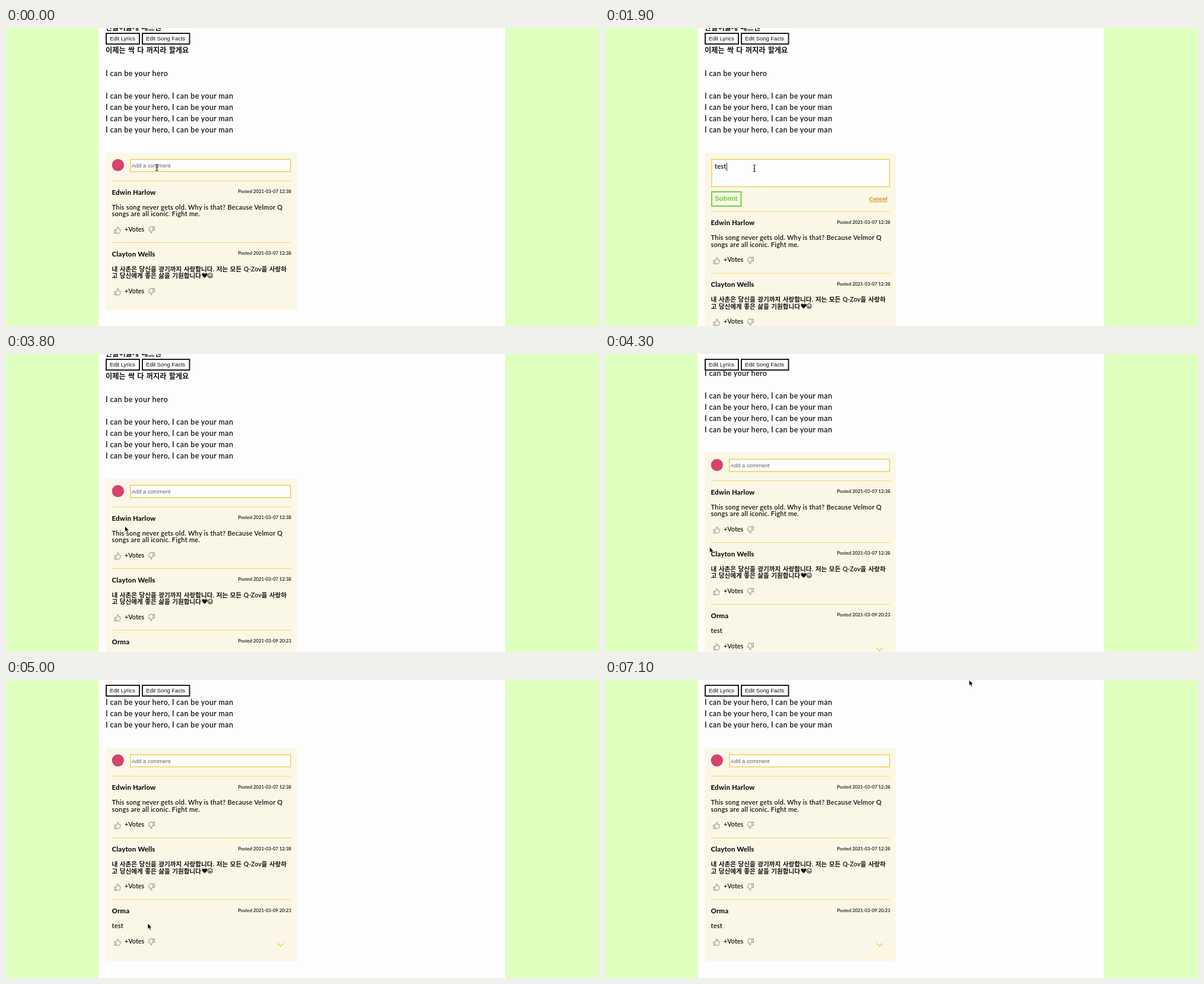
An HTML page for the animation above (7.2 s loop, 1000 by 502 pixels).

```html
<!DOCTYPE html>
<html lang="ko">
<head>
<meta charset="utf-8">
<title>Comments</title>
<style>
html, body { margin: 0; width: 100%; height: 100%; overflow: hidden; background: #deffbd; }
svg { display: block; width: 1000px; height: 502px; }
text { font-family: Lato, "Noto Sans CJK KR", "Noto Sans CJK", sans-serif; font-weight: 600; fill: #111; white-space: pre; }
.ui { font-family: "Liberation Sans", Arial, sans-serif; font-weight: 400; font-size: 9.4px; }
.bold { font-weight: 700; }
.lyric { font-size: 12.5px; letter-spacing: .36px; }
.lyric-ko { font-size: 12.2px; word-spacing: 1.2px; }
.name { font-size: 11.5px; font-weight: 800; letter-spacing: .15px; }
.date { font-size: 7.8px; text-anchor: end; }
.body { font-size: 11px; letter-spacing: .25px; }
.body-ko { font-size: 10.6px; word-spacing: .9px; }
.votes { font-size: 10.8px; }
.field { fill: #fdfdfd; stroke: #eed262; stroke-width: 1.6; }
.rule { stroke: #f1d670; stroke-width: 1; }
.icon { fill: none; stroke: #85837a; stroke-width: .9; stroke-linejoin: round; }
</style>
</head>
<body>
<svg viewBox="0 0 1000 502">
  <defs>
    <path id="thumb" class="icon" d="M-5-.5h2.6v6H-5zM-2.4-.2L-.3-2.6V-5.2Q1.8-5.8 1.9-3.2L1.5-1.4H4Q5.5-1.2 5-.1L4 4.4Q3.7 5.5 2.6 5.5H-1L-2.4 4.8"/>
  </defs>
  <rect width="1000" height="502" fill="#deffbd"/>
  <rect x="156.5" width="685.5" height="502" fill="#fdfdfd"/>
  <g id="page">
    <g id="lyrics"></g>
    <rect id="panel" x="168" y="210" width="322.5" fill="#fbf7e6"/>
    <g id="closed">
      <circle cx="188.8" cy="231" r="10.2" fill="#d6436b"/>
      <rect class="field" x="209.8" y="221.3" width="270" height="20.6"/>
      <text class="ui" x="211.8" y="235" fill-opacity=".65">Add a comment</text>
    </g>
    <g id="open">
      <rect class="field" x="179.8" y="221.3" width="300" height="46"/>
      <text id="hint" x="188" y="239" font-size="11.5" letter-spacing=".15" style="fill:#666;font-weight:500">Add a comment</text>
      <text id="typed" x="185" y="237" class="body"></text>
      <rect id="caret" y="227" width="1" height="14" fill="#222"/>
      <rect x="180" y="276" width="49.5" height="24" fill="#fcf9ec" stroke="#6bd636" stroke-width="2"/>
      <text class="ui bold" x="185" y="291.3" style="font-size:11.4px;fill:#5fd321">Submit</text>
      <text class="ui bold" x="445.5" y="291.3" text-decoration="underline" style="fill:#c2981c">Cancel</text>
    </g>
    <g id="comments"></g>
  </g>
  <rect x="168" y="8" width="322" height="20" fill="#fdfdfd"/>
  <g id="buttons"></g>
  <g id="cursor">
    <path id="arrow" d="M0 0V9.6L2.2 7.6 3.8 11.2 5.6 10.4 4 7H7z" fill="#000" stroke="#fff" stroke-width=".7"/>
    <path id="beam" d="M-2.2-5.5Q0-5.5 0-4V4Q0 5.5-2.2 5.5M2.2-5.5Q0-5.5 0-4M0 4Q0 5.5 2.2 5.5M-1.3.8H1.3" fill="none" stroke="#222" stroke-width="1.1"/>
    <path id="hand" d="M-1.2 5.5V-4Q-.2-5.8.8-4V-.6Q2-1.4 2.6-.2 3.8-.8 4.2.4 5.6 0 5.6 1.6V4Q5.4 6 4.4 7.4H-.2Q-1.6 5.6-3.4 3.2-3.9 1.8-2.5 2L-1.2 3.2" fill="#fff" stroke="#222" stroke-width="1"/>
  </g>
</svg>
<script>
const LOOP = 7200, STEP = 100;
const $ = id => document.getElementById(id);
const text = (cls, x, y, s) => `<text class="${cls}" x="${x}" y="${y}">${s}</text>`;
const show = (id, on) => $(id).setAttribute('visibility', on ? 'inherit' : 'hidden');
const move = (id, x, y) => $(id).setAttribute('transform', `translate(${x} ${y})`);

const hero = 'I can be your hero';
$('lyrics').innerHTML =
  text('lyric-ko', 168, 4, '만들어줄게 메르맨') +
  text('lyric-ko', 168, 42, '이제는 싹 다 꺼지라 할게요') +
  text('lyric', 168, 80.5, hero) +
  [0, 1, 2, 3].map(i => text('lyric', 168, 118.5 + 19 * i, hero + ', I can be your man')).join('');

const button = (x, w, label) =>
  `<rect x="${x}" y="9" width="${w}" height="18" fill="#fdfdfd" stroke="#1c1c1c" stroke-width="2"/>` +
  text('ui', x + 6, 21, label);
$('buttons').innerHTML = button(169, 56, 'Edit Lyrics') + button(230, 79.5, 'Edit Song Facts');

function comment(i, name, date, cls, lines, extra = '') {
  const votes = 74 + 11.3 * (lines.length - 1);
  return `<g id="c${i}" transform="translate(0 ${257.5 + 104 * i})">
    <path class="rule" d="M178.5 0H480.5"/>` +
    text('name', 178.5, 23, name) + text('date', 481, 20.5, 'Posted ' + date) +
    lines.map((s, n) => text(cls, 178.5, 48.3 + 11.3 * n, s)).join('') +
    text('votes', 200, votes, '+Votes') +
    `<use href="#thumb" x="188" y="${votes - 2.5}"/>
    <use href="#thumb" transform="translate(245.5 ${votes - 2.5}) rotate(180)"/>${extra}</g>`;
}
const emoji = `<path d="M335 59.500C328.500 54.500 330 51 333 51.600Q334.500 52 335 53.200Q335.500 52 337 51.600C340 51 341.500 54.500 335 59.500" fill="#111"/>
  <circle cx="344.300" cy="55.500" r="4" fill="none" stroke="#111"/>
  <path d="M342 54.200h1.500M345.200 54.200h1.500M342 56.500Q344.300 59 346.600 56.500z" stroke="#111" stroke-width=".8" fill="none"/>`;
const chevron = '<path d="M458 73.500L463 78.500 468 73.500" fill="none" stroke="#f0d56c" stroke-width="2"/>';
$('comments').innerHTML =
  comment(0, 'Edwin Harlow', '2021-03-07 12:38', 'body',
    ['This song never gets old. Why is that? Because Velmor Q', 'songs are all iconic. Fight me.']) +
  comment(1, 'Clayton Wells', '2021-03-07 12:38', 'body-ko',
    ['내 사촌은 당신을 광기까지 사랑합니다. 저는 모든 Q-Zov을 사랑하', '고 당신에게 좋은 삶을 기원합니다'], emoji) +
  comment(2, 'Orma', '2021-03-09 20:23', 'body', ['test'], chevron);

// Keys are [time, ...values]; each leg eases in and out unless linear.
function track(keys, t, linear) {
  const n = keys.findIndex(k => k[0] > t);
  if (n < 0) return keys[keys.length - 1].slice(1);
  if (n === 0) return keys[0].slice(1);
  const a = keys[n - 1], b = keys[n];
  let p = (t - a[0]) / (b[0] - a[0]);
  if (!linear) p *= p * (3 - 2 * p);
  return a.slice(1).map((v, i) => v + (b[i + 1] - v) * p);
}
const scrollKeys = [[3900, 0], [4100, 16], [4400, 58], [4600, 82], [4800, 95.5]];
const mouseKeys = [
  [200, 254.5, 235], [500, 254.5, 233], [1800, 254.5, 233], [2500, 206, 291],
  [3500, 206, 291], [3800, 200.5, 290], [4400, 174.5, 328], [4700, 205, 385],
  [5000, 239, 410], [5100, 211, 428], [5300, 209, 430], [5500, 209, 430],
  [6300, 732, 219], [6800, 614, 0]
];

function draw(t) {
  const open = t >= 900 && t < 3600, posted = t >= 3600;
  const typing = t >= 1500 && t < 1900;
  const letters = t < 1500 ? 0 : t < 1900 ? Math.min(3, 1 + Math.floor((t - 1500) / 100)) : 4;

  show('open', open);
  show('closed', !open);
  show('c2', posted);
  move('comments', 0, open ? 51.5 : 0);
  $('panel').setAttribute('height', posted ? 358.5 : open ? 316.5 : 265);
  move('page', 0, -track(scrollKeys, t, true)[0]);

  $('typed').textContent = 'test'.slice(0, letters);
  show('hint', open && !letters);
  show('caret', open && t < 2100);
  $('caret').setAttribute('x', 185.2 + (letters ? $('typed').getComputedTextLength() : 0));

  const [x, y] = track(mouseKeys, t);
  const kind = t < 900 || (open && y < 268) ? 'beam' : open && y > 275 && x < 230 ? 'hand' : 'arrow';
  for (const id of ['arrow', 'beam', 'hand']) show(id, id === kind && !typing);
  move('cursor', x, y);
}

const start = performance.now();
function tick() {
  const t = (performance.now() - start) % LOOP;
  draw(Math.floor(t / STEP) * STEP);
  requestAnimationFrame(tick);
}
tick();
</script>
</body>
</html>
```
